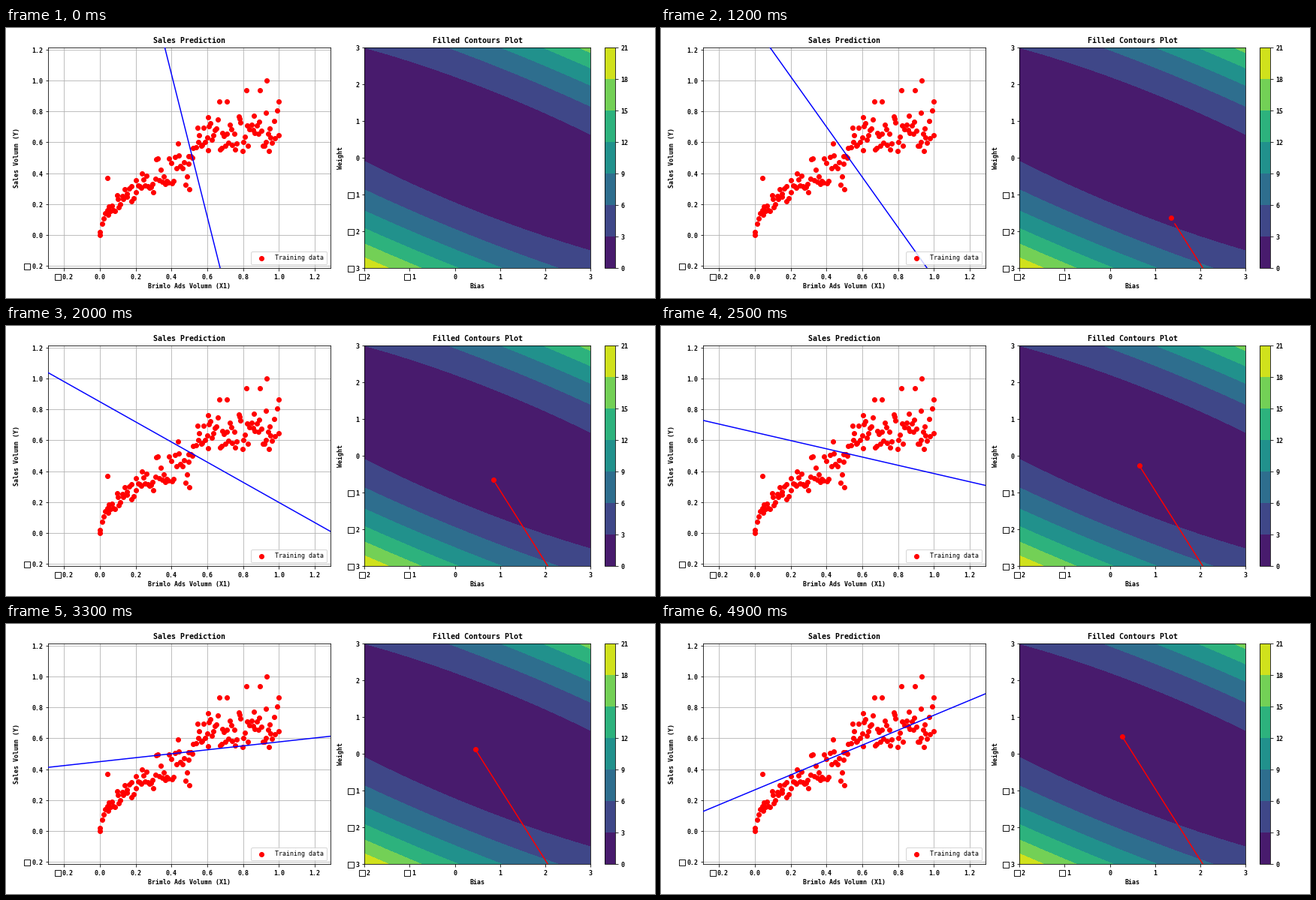
Recreate the animation shown at these times as a matplotlib script. Size 864 by 360 pixels, loop 5 s.

```python
import numpy as np
import matplotlib.pyplot as plt
from matplotlib.animation import FuncAnimation
from matplotlib.patches import Rectangle

W, H = 864, 360
FRAMES, INTERVAL = 50, 100
TOP, BOTTOM = 26.2, 320.2
CHAR = 5  # advance of one tick label character in pixels

plt.rcParams["font.family"] = "DejaVu Sans Mono"
fig = plt.figure(figsize=(12, 5), dpi=72, facecolor="white")

# Full-stage axes in pixel units for all lettering
stage = fig.add_axes([0, 0, 1, 1])
stage.set(xlim=(0, W), ylim=(H, 0))
stage.axis("off")


def panel(left, right, xlim, ylim):
    ax = fig.add_axes([left / W, 1 - BOTTOM / H, (right - left) / W, (BOTTOM - TOP) / H])
    ax.set(xlim=xlim, ylim=ylim)
    return ax


def write(x, y, text, size=8.3, **style):
    stage.text(x, y, text, size=size, weight="bold", **style)


def tick_label(x, y, value, fmt, align):
    """Number whose minus sign shows as an empty box."""
    text = format(abs(value), fmt)
    negative = value < -1e-9
    width = CHAR * len(text) + (2 * CHAR if negative else 0)
    left = x - width * {"left": 0, "center": 0.5, "right": 1}[align]
    if negative:
        stage.add_patch(Rectangle((left, y - 4), 8, 8, fill=False, ec="black", lw=0.9))
        left += 2 * CHAR
    write(left, y + 3.3, text)


def label_axes(ax, xticks, yticks, fmt, title, xlabel, ylabel, ylabel_x):
    ax.set_xticks(xticks, [""] * len(xticks))
    ax.set_yticks(yticks, [""] * len(yticks))
    box = ax.get_position()
    left, right = box.x0 * W, box.x1 * W
    (x0, x1), (y0, y1) = ax.get_xlim(), ax.get_ylim()
    for v in xticks:
        tick_label(left + (v - x0) / (x1 - x0) * (right - left), 331.6, v, fmt, "center")
    for v in yticks:
        y = BOTTOM - (v - y0) / (y1 - y0) * (BOTTOM - TOP)
        tick_label(left - 7, y + 0.7, v, fmt, "right")
    middle = (left + right) / 2
    write(middle, 20, title, size=10, ha="center")
    write(middle, 347.3, xlabel, ha="center")
    write(ylabel_x, (TOP + BOTTOM) / 2, ylabel, ha="center", va="center", rotation=90)


def training_data(count=125, seed=7):
    """Cloud between two square-root-like edges, denser near the lower one."""
    rng = np.random.RandomState(seed)
    x = (np.arange(count) + rng.rand(count)) / count
    upper = .95 * np.sqrt(x)
    lower = np.where(x < .52, np.minimum(.5 * np.sqrt(x), .3), .54)
    y = lower + (upper - lower) * rng.beta(1.3, 2, count)
    extremes = [(0, 0), (.04, .37), (.5, .295), (.605, .76), (.665, .865), (.71, .865),
                (.82, .935), (.895, .935), (.93, 1), (.945, .545), (1, .865)]
    return np.vstack([extremes, np.column_stack([x, y])]).T


fit_ax = panel(56.2, 432.2, (-.289, 1.289), (-.2146, 1.2126))
fit_ax.grid(True)
fit_ax.scatter(*training_data(), s=36, color="red", zorder=2, label="Training data")
fit_line, = fit_ax.plot([], [], color="blue", lw=1.5, zorder=3)
fit_ax.legend(loc="lower right", prop={"size": 8.3}, borderpad=.48, handlelength=2.41,
              handletextpad=.96, borderaxespad=.6)
fifths = np.arange(-1, 7) * .2
label_axes(fit_ax, fifths, fifths, ".1f", "Sales Prediction",
           "Brimlo Ads Volumn (X1)", "Sales Volumn (Y)", 15)


def cost(p, q):
    """Mean squared error written through the moments of the data."""
    mx, my, xx, xy, yy = .479, .495, .316, .292, .29
    return p * p * xx + q * q + 2 * p * q * mx - 2 * p * xy - 2 * q * my + yy


cost_ax = panel(477.2, 778.2, (-2, 3), (-3, 3))
P, Q = np.meshgrid(np.linspace(-2, 3, 120), np.linspace(-3, 3, 120))
levels = np.arange(0, 22, 3)
filled = cost_ax.contourf(P, Q, cost(P, Q), levels=levels, cmap="viridis")
trail, = cost_ax.plot([], [], color="red", lw=1.5)
dot, = cost_ax.plot([], [], "o", color="red", ms=6)
label_axes(cost_ax, np.arange(-2, 4), np.arange(-3, 4), ".0f",
           "Filled Contours Plot", "Bias", "Weight", 446)

bar_ax = panel(797.2, 811.2, (0, 1), (0, 21))
bar = fig.colorbar(filled, cax=bar_ax)
bar.set_ticks(levels, labels=[""] * len(levels))
for v in levels:
    tick_label(818.5, BOTTOM - v / 21 * (BOTTOM - TOP) + 0.7, v, "d", "left")


def descent(t):
    """Bias and weight after t steps of gradient descent."""
    decay = np.exp(-.0697 * t)
    return .1775 + 2.7076 * decay, .656 - 5.27 * decay


def update(t):
    bias, weight = descent(t)
    x = np.array(fit_ax.get_xlim())
    fit_line.set_data(x, weight * x + bias)
    dot.set_data([bias], [weight])
    trail.set_data(*descent(np.arange(t)))  # stops one step behind the dot
    return fit_line, trail, dot


anim = FuncAnimation(fig, update, frames=FRAMES, interval=INTERVAL, repeat=True,
                     repeat_delay=0, blit=False)
plt.show()
```
